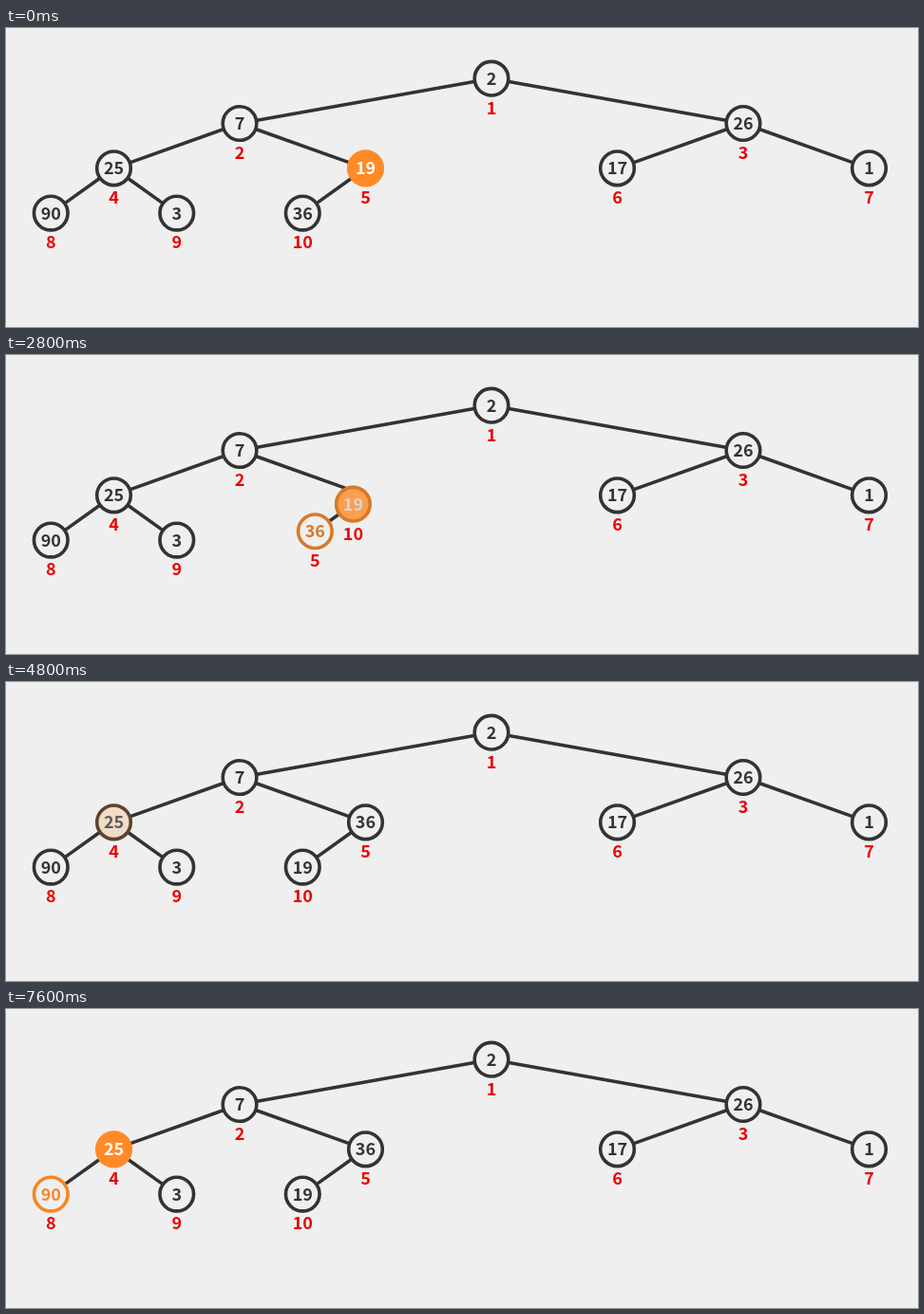
An HTML page for the animation above (8000 ms loop, 960 by 315 pixels).

```html
<!DOCTYPE html>
<html lang="en">
<head>
<meta charset="utf-8">
<title>Building a binary heap</title>
<style>
  html, body { margin: 0; width: 100%; height: 100%; overflow: hidden; background: #efefef; }
  svg { display: block; width: 960px; height: 315px; }
  line { stroke: #333; stroke-width: 3.6; }
  circle { stroke-width: 3.6; }
  text {
    font: bold 18px "Noto Sans CJK JP", "Noto Sans CJK SC", "Noto Sans CJK", "Noto Sans", sans-serif;
    text-anchor: middle;
  }
  .index { fill: #e90000; }
</style>
</head>
<body>
<svg id="tree" viewBox="0 0 960 315"></svg>
<script>
const LOOP = 8000, TICK = 400, STEP = 2000, DELAY = 66;
const DARK = [51, 51, 51], PAPER = [239, 239, 239], ORANGE = [255, 138, 39], WHITE = [255, 255, 255];
const RADIUS = 17.8;
const values = [2, 7, 26, 25, 19, 17, 1, 90, 3, 36];
const svg = document.getElementById('tree');

function add(parent, tag, attrs) {
  const el = document.createElementNS('http://www.w3.org/2000/svg', tag);
  for (const key in attrs) el.setAttribute(key, attrs[key]);
  return parent.appendChild(el);
}

// Centre of heap slot i (1-based)
function slot(i) {
  const level = Math.floor(Math.log2(i));
  const gap = 1060 / 2 ** level;
  return { x: 511 - 530 + gap * (i - 2 ** level + 0.5), y: 53.2 + 47.3 * level };
}

function addEdge(i) {
  const a = slot(i >> 1), b = slot(i);
  const len = Math.hypot(b.x - a.x, b.y - a.y);
  const dx = (b.x - a.x) / len * 18.5, dy = (b.y - a.y) / len * 18.5;
  add(svg, 'line', { x1: a.x + dx, y1: a.y + dy, x2: b.x - dx, y2: b.y - dy });
}

function addNode(value, n) {
  const g = add(svg, 'g', {});
  const node = {
    g,
    disc: add(g, 'circle', { r: RADIUS }),
    text: add(g, 'text', { y: 6.5 }),
    index: add(g, 'text', { y: 37.4, class: 'index' })
  };
  node.text.textContent = value;
  node.index.textContent = n + 1;
  place(node, slot(n + 1));
  paint(node, DARK, PAPER, DARK);
  return node;
}

function place(node, p) {
  node.g.setAttribute('transform', `translate(${p.x} ${p.y})`);
}

function paint(node, ring, fill, ink) {
  node.disc.setAttribute('stroke', rgb(ring));
  node.disc.setAttribute('fill', rgb(fill));
  node.text.setAttribute('fill', rgb(ink));
}

const rgb = c => `rgb(${c.map(Math.round)})`;
const lerp = (a, b, p) => a + (b - a) * p;
const mix = (a, b, p) => a.map((v, i) => lerp(v, b[i], p));
const between = (a, b, p) => ({ x: lerp(a.x, b.x, p), y: lerp(a.y, b.y, p) });
const cubicInOut = u => u < 0.5 ? 4 * u ** 3 : 1 - 4 * (1 - u) ** 3;

function progress(t, step) {
  const u = (t - DELAY - STEP * step) / STEP;
  return cubicInOut(Math.min(1, Math.max(0, u)));
}

for (let i = 2; i <= values.length; i++) addEdge(i);
const nodes = values.map(addNode);
const parent = nodes[4], child = nodes[9], next = nodes[3], leaf = nodes[7];
const upper = slot(5), lower = slot(10);

function draw(t) {
  const [pick, swap, focus, compare] = [0, 1, 2, 3].map(k => progress(t, k));

  // Larger child lights up, then trades places with its parent
  const hot = mix(mix(DARK, ORANGE, pick), DARK, swap);
  paint(child, hot, PAPER, hot);
  paint(parent, mix(ORANGE, DARK, swap), mix(ORANGE, PAPER, swap), mix(WHITE, DARK, swap));
  place(parent, between(upper, lower, swap));
  place(child, between(lower, upper, swap));
  parent.index.textContent = swap > 0 ? 10 : 5;
  child.index.textContent = swap > 0 ? 5 : 10;

  // The next parent is visited and compared with its child
  paint(next, mix(DARK, ORANGE, focus), mix(PAPER, ORANGE, focus), mix(DARK, WHITE, focus));
  const lit = mix(DARK, ORANGE, compare);
  paint(leaf, lit, PAPER, lit);
}

let shown = -1;
function frame() {
  // The picture advances in fixed ticks; the small lead absorbs timer jitter
  const t = Math.floor((performance.now() + 16) / TICK) * TICK % LOOP;
  if (t !== shown) draw(shown = t);
  requestAnimationFrame(frame);
}
frame();
</script>
</body>
</html>
```
